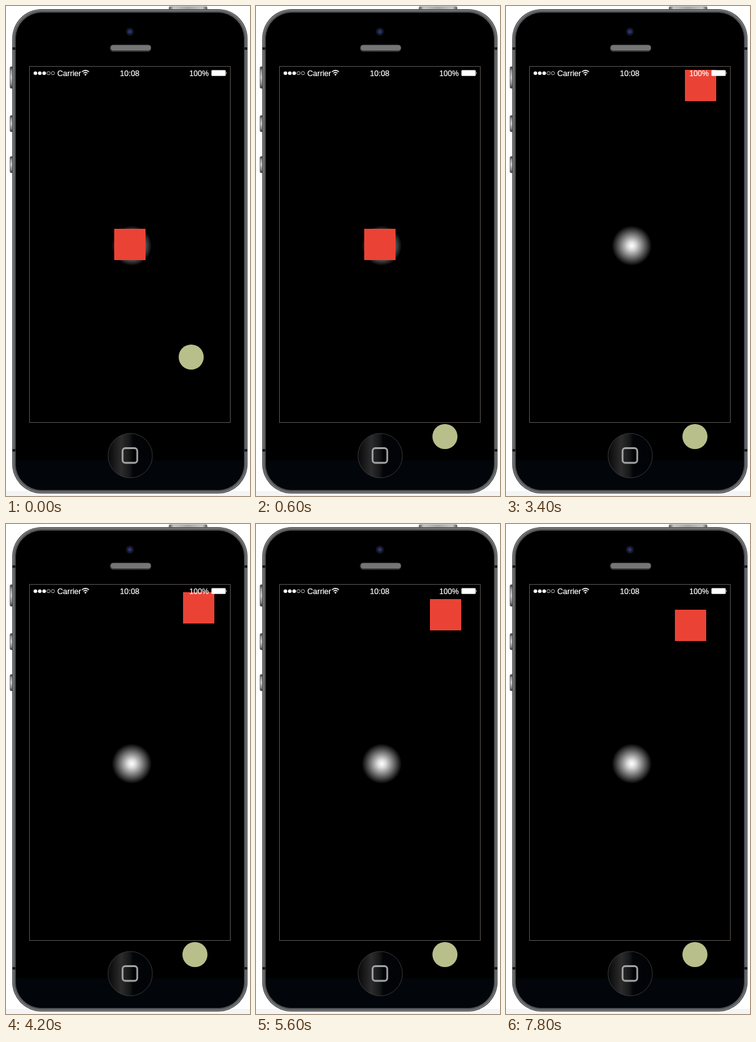
Write an HTML page that moves like this. It is 390x783 px and loops after 8000 ms.

```html
<!DOCTYPE html>
<html lang="en">
<head>
<meta charset="utf-8">
<title>Phone gravity</title>
<style>
html, body { margin: 0; width: 100%; height: 100%; overflow: hidden; background: #fff; }
svg { display: block; }
text { font-family: "Liberation Sans", Arial, sans-serif; fill: #fff; stroke: #fff; stroke-width: .2; }
</style>
</head>
<body>
<svg width="390" height="783" viewBox="0 0 390 783">
  <defs>
    <radialGradient id="glow">
      <stop offset="0" stop-color="#fff"/>
      <stop offset=".2" stop-color="#dcdcdc"/>
      <stop offset="1" stop-color="#000"/>
    </radialGradient>
    <linearGradient id="home">
      <stop offset="0" stop-color="#080808"/>
      <stop offset=".3" stop-color="#2c2c2d"/>
      <stop offset=".48" stop-color="#171819"/>
      <stop offset=".57" stop-color="#020407"/>
      <stop offset="1" stop-color="#010306"/>
    </linearGradient>
    <linearGradient id="sideKey" x2="0" y2="1">
      <stop offset="0" stop-color="#333"/>
      <stop offset=".2" stop-color="#999"/>
      <stop offset=".5" stop-color="#ccc"/>
      <stop offset=".8" stop-color="#888"/>
      <stop offset="1" stop-color="#333"/>
    </linearGradient>
    <linearGradient id="topKey">
      <stop offset="0" stop-color="#555"/>
      <stop offset=".12" stop-color="#ccc"/>
      <stop offset=".5" stop-color="#aaa"/>
      <stop offset=".88" stop-color="#ccc"/>
      <stop offset="1" stop-color="#555"/>
    </linearGradient>
    <pattern id="mesh" width="2" height="2" patternUnits="userSpaceOnUse">
      <rect width="2" height="2" fill="#666"/>
      <path d="M0 0h1v1h-1zM1 1h1v1h-1z" fill="#858585"/>
    </pattern>
    <clipPath id="face"><rect x="16" y="11" width="364" height="762" rx="41"/></clipPath>
  </defs>

  <rect y="775" width="390" height="8" fill="#f4f4f4"/>

  <g id="phone">
    <rect x="260.5" y="1" width="61" height="6" rx="1.5" fill="url(#topKey)" stroke="#777" stroke-width=".6"/>
    <g fill="url(#sideKey)" stroke="#555" stroke-width=".7">
      <rect x="6.4" y="97" width="6" height="34.5" rx="2"/>
      <rect x="6.4" y="175" width="6" height="26" rx="2"/>
      <rect x="6.4" y="240.5" width="6" height="26" rx="2"/>
    </g>
    <rect x="10" y="5" width="376" height="774" rx="47" fill="#404143"/>
    <rect x="11.7" y="6.7" width="372.6" height="770.6" rx="45.3" fill="#5b5c5e" stroke="#858688" stroke-width="1.2"/>
    <path d="M10 66h5v4h-5zM381 66h5v4h-5zM10 708h5v4h-5zM381 708h5v4h-5z" fill="#1b1b1c"/>
    <rect x="15.5" y="10.5" width="365" height="763" rx="41.5" stroke="#252627"/>
    <rect x="16" y="726" width="364" height="47" fill="#02060b" clip-path="url(#face)"/>

    <circle cx="198" cy="41" r="6.3" fill="#15171d"/>
    <circle cx="198" cy="41" r="3.8" fill="#1c2150"/>
    <circle cx="198" cy="41" r="2.3" fill="#38438c"/>
    <circle cx="198" cy="41" r="1.1" fill="#171c48"/>
    <rect x="166" y="61.7" width="66" height="11.5" rx="5.5" fill="#333637"/>
    <rect x="167.5" y="62.5" width="64" height="8.6" rx="4" fill="url(#mesh)"/>

    <rect x="37.5" y="96.5" width="321" height="569" stroke="#595350"/>
    <circle cx="201" cy="383" r="32" fill="url(#glow)"/>
    <rect id="square" width="50" height="50" fill="#ea4335"/>

    <g fill="#fff">
      <circle cx="47" cy="107.3" r="2.9"/>
      <circle cx="54" cy="107.3" r="2.9"/>
      <circle cx="61" cy="107.3" r="2.9"/>
    </g>
    <g fill="none" stroke="#fff" stroke-width=".7">
      <circle cx="68" cy="107.3" r="2.6"/>
      <circle cx="75" cy="107.3" r="2.6"/>
    </g>
    <text x="82" y="111.5" font-size="12.5">Carrier</text>
    <g fill="none" stroke="#fff" stroke-width="1.5">
      <path d="M121.5 105.2q5.5-4.6 11 0M123.7 107.5q3.3-2.8 6.6 0"/>
    </g>
    <path d="M125.1 109.3q1.9-1.5 3.8 0l-1.9 2.2z" fill="#fff"/>
    <text x="182" y="111.5" font-size="12.5">10:08</text>
    <text x="293" y="111.5" font-size="12.2">100%</text>
    <rect x="328.4" y="102.4" width="22.7" height="9.4" rx="1.4" fill="#fff"/>
    <path d="M351.8 105.3q2 1.8 0 3.6z" fill="#fff"/>

    <circle cx="198.5" cy="718.5" r="35.5" fill="url(#home)" stroke="#3c3d3f" stroke-width=".9"/>
    <rect x="186.3" y="706.5" width="23.5" height="23.5" rx="4.5" fill="none" stroke="#a3a3a3" stroke-width="2.8"/>
  </g>

  <circle id="touch" r="20" fill="#e3ecac" fill-opacity=".81"/>
</svg>
<script>
const LOOP = 8000, STEP = 200, FLASH = 3200;
const [phone, square, touch] = ["phone", "square", "touch"].map(id => document.getElementById(id));
const place = (el, x, y) => el.setAttribute("transform", `translate(${x} ${y})`);

function draw(now) {
  const t = Math.floor(now % LOOP / STEP) * STEP;
  phone.style.visibility = t === FLASH ? "hidden" : "visible";

  const drag = Math.min(t / 600, 1);
  place(touch, 296 + 6 * drag, 561 + 127 * drag);

  // After the flash the square drifts slowly toward the glow.
  const drift = (t - FLASH) / STEP - 1;
  if (drift < 0) place(square, 173, 356);
  else place(square, Math.round(286.2 - .72 * drift), Math.round(102.2 + 1.6 * drift));
}

const start = performance.now();
function tick() {
  draw(performance.now() - start);
  requestAnimationFrame(tick);
}
tick();
</script>
</body>
</html>
```
